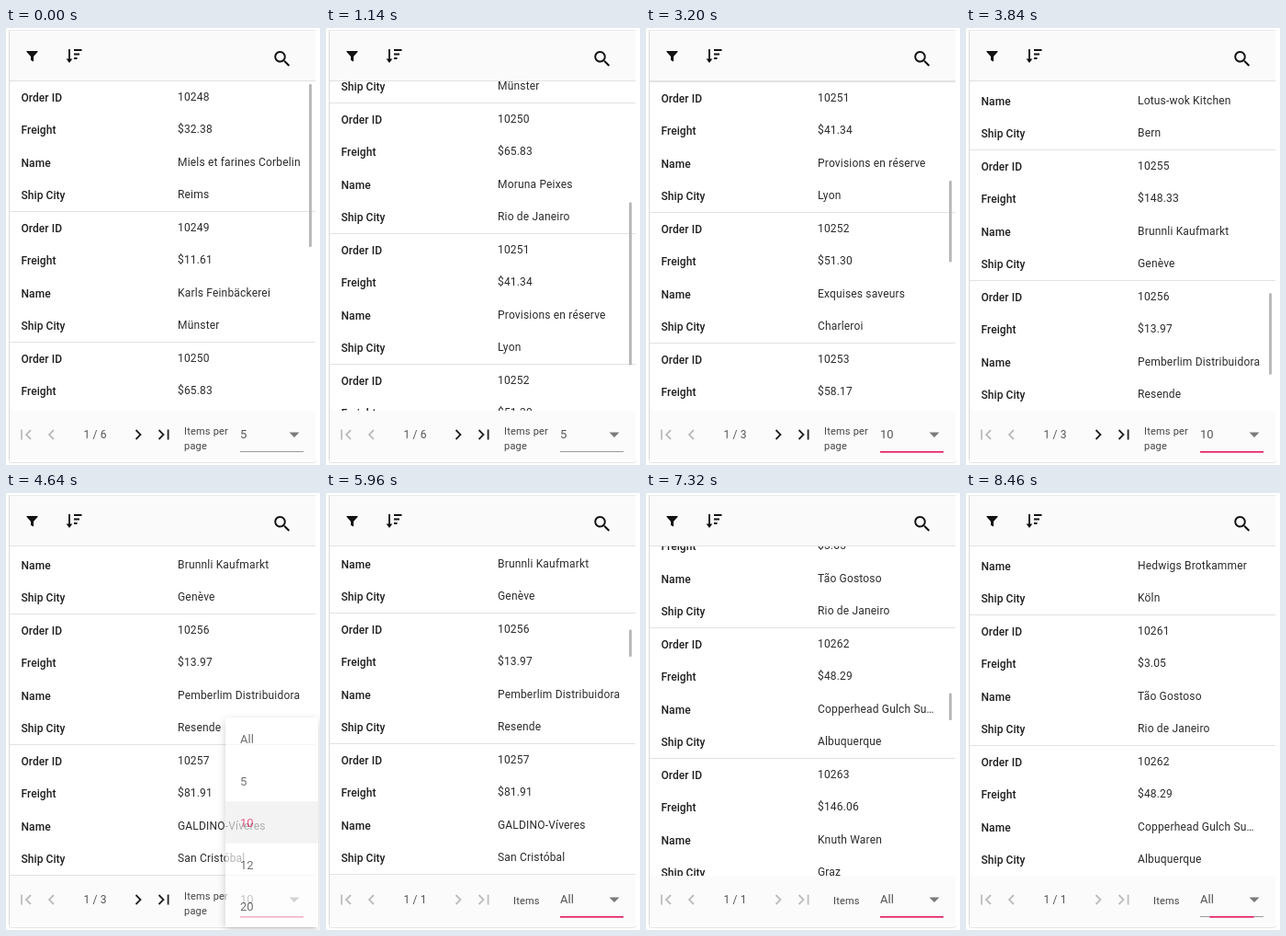
These frames come from a looping animation (342x475 px, 8.48 s). An HTML page:

```html
<!DOCTYPE html>
<html lang="en">
<head>
<meta charset="utf-8">
<title>Order list with paging</title>
<style>
html, body { margin: 0; width: 100%; height: 100%; overflow: hidden; background: #fff; }
svg { display: block; width: 342px; height: 475px; font-family: Roboto, "Open Sans", sans-serif; }
.label { font-size: 12px; font-weight: 500; letter-spacing: .06px; fill: #1f1f1f; }
.value { font-size: 12px; letter-spacing: .18px; fill: #2b2b2b; }
.pager { font-size: 12px; letter-spacing: .15px; fill: #555; }
.small { font-size: 11px; letter-spacing: .2px; fill: #444; }
.pick { font-size: 13px; fill: #555; }
.option { font-size: 13px; }
</style>
</head>
<body>
<svg viewBox="0 0 342 475" xmlns="http://www.w3.org/2000/svg">
  <defs>
    <clipPath id="view"><rect x="4" y="58" width="333" height="358"/></clipPath>
    <filter id="shade" x="-30%" y="-20%" width="160%" height="140%">
      <feDropShadow dx="0" dy="3" stdDeviation="5" flood-color="#000" flood-opacity=".28"/>
    </filter>
  </defs>
  <rect width="342" height="475" fill="#fff"/>

  <g clip-path="url(#view)"><g id="list"></g></g>
  <rect id="thumb" x="330" width="3" rx="1" fill="#bababa"/>

  <rect x="4" y="3" width="333" height="54" fill="#fafafa"/>
  <rect x="4" y="57" width="333" height="1" fill="#e2e2e2"/>
  <rect x="4" y="2" width="333" height="1" fill="#e9e9e9"/>
  <path d="M22.5 25H34.5V26L30 31V36.5L27 35V31L22.5 26Z" fill="#111"/>
  <path d="M69 23V35M74 24H82.5M74 28.5H80M74 33H77.5" fill="none" stroke="#111" stroke-width="1.8"/>
  <path d="M65.6 33.5H72.4L69 38Z" fill="#111"/>
  <path transform="translate(289.4 22.1) scale(.96)" fill="#111" d="M15.5 14h-.79l-.28-.27A6.5 6.5 0 1 0 13.73 14.43l.27.28v.79l5 4.99L20.49 19zM9.5 14a4.5 4.5 0 1 1 0-9a4.5 4.5 0 0 1 0 9z"/>

  <rect x="4" y="416" width="333" height="54" fill="#fbfbfb"/>
  <path d="M3.5 2V470Q3.5 472.5 6 472.5H335Q337.5 472.5 337.5 470" fill="none" stroke="#e4e4e4"/>
  <rect x="3" y="3" width="1" height="466" fill="#d9d9d9"/>
  <g fill="none" stroke-width="1.8">
    <path d="M17 436.5V447.5M27 437L22 442L27 447M52 437L47 442L52 447" stroke="#bdbdbd"/>
    <path id="next" d="M141.5 437L146.5 442L141.5 447M166.5 437L171.5 442L166.5 447M176.6 436.5V447.5"/>
  </g>
  <text id="page" class="pager" x="84.5" y="446"></text>
  <text id="items" class="small" y="442"></text>
  <text id="items2" class="small" x="194" y="458">page</text>
  <text id="size" class="pick" x="255" y="446"></text>
  <path d="M308.5 439.5H319.5L314 445Z" fill="#7a7a7a"/>
  <rect x="255" y="460" width="69" height="1" fill="#9a9a9a"/>
  <rect id="line" y="460" height="1.6" fill="#e3165b"/>

  <g id="popup">
    <rect x="239" y="244" width="101" height="228" rx="2" fill="#fff" filter="url(#shade)"/>
    <g id="options"></g>
  </g>
</svg>
<script>
const LOOP = 8480, STEP = 20, RECORD = 142, VIEW = 358;
const $ = id => document.getElementById(id);

function add(parent, tag, attrs, text) {
  const el = document.createElementNS("http://www.w3.org/2000/svg", tag);
  set(el, attrs);
  if (text) el.textContent = text;
  parent.appendChild(el);
  return el;
}
function set(el, attrs) {
  for (const k in attrs) el.setAttribute(k, attrs[k]);
}
const ramp = (t, a, b) => Math.min(1, Math.max(0, (t - a) / (b - a)));

const orders = `32.38|Miels et farines Corbelin|Reims
11.61|Karls Feinbäckerei|Münster
65.83|Moruna Peixes|Rio de Janeiro
41.34|Provisions en réserve|Lyon
51.30|Exquises saveurs|Charleroi
58.17|Moruna Peixes|Rio de Janeiro
22.98|Lotus-wok Kitchen|Bern
148.33|Brunnli Kaufmarkt|Genève
13.97|Pemberlim Distribuidora|Resende
81.91|GALDINO-Víveres|San Cristóbal
140.51|Knuth Waren|Graz
3.25|Galería mercantil Xolo…|México D.F.
55.09|Hedwigs Brotkammer|Köln
3.05|Tão Gostoso|Rio de Janeiro
48.29|Copperhead Gulch Su…|Albuquerque
146.06|Knuth Waren|Graz
3.67|Skog och ål HB|Bräcke`.split("\n").map(s => s.split("|"));

const labels = ["Order ID", "Freight", "Name", "Ship City"];
orders.forEach(([freight, name, city], n) => {
  const top = 57 + n * RECORD;
  [10248 + n, "$" + freight, name, city].forEach((value, i) => {
    const y = top + Math.floor(35.5 * i);
    add($("list"), "text", { class: "label", x: 16.5, y: y + 23 }, labels[i]);
    add($("list"), "text", { class: "value", x: 187, y: y + 22 }, String(value));
  });
  add($("list"), "rect", { x: 4, y: top + RECORD, width: 333, height: 1, fill: "#e2e2e2" });
});

const sizes = ["All", "5", "10", "12", "20"];
const options = sizes.map((text, i) => {
  const y = 244 + i * 45.6;
  return {
    bg: add($("options"), "rect", { x: 239, y, width: 101, height: 45.6 }),
    label: add($("options"), "text", { class: "option", x: 255, y: y + 28 }, text)
  };
});

// [time, scroll offset]
const path = [
  [620, 0], [740, 100], [880, 100], [1140, 260], [1320, 352],
  [3120, 352], [3200, 425], [3840, 919], [3980, 1062],
  [5940, 1062], [5960, 1063], [6560, 1719], [6800, 1980],
  [6810, 1980], [7180, 1905], [7300, 1905], [7520, 1838],
  [7640, 1838], [7820, 1771]
];
function scrollAt(t) {
  if (t <= path[0][0]) return 0;
  for (let i = 1; i < path.length; i++) {
    const [a, from] = path[i - 1], [b, to] = path[i];
    if (t <= b) return Math.round(from + (to - from) * ramp(t, a, b));
  }
  return path[path.length - 1][1];
}

// [shown from, fade start, fade end]
const shown = [[0, 1500, 1700], [3140, 4160, 4380], [5960, 8020, 8240]];
// [open, hover, close start, close end, chosen before, chosen after]
const menus = [[2080, 2580, 2640, 2780, "5", "10"], [4600, 5300, 5360, 5520, "10", "All"]];

function drawMenu(t) {
  const menu = menus.find(m => t >= m[0] && t < m[3]);
  $("popup").style.display = menu ? "" : "none";
  if (!menu) return;
  const [open, hover, close, end, before, after] = menu;
  set($("popup"), { opacity: ramp(t, open, open + 60) * (1 - ramp(t, close, end)) });
  options.forEach(({ bg, label }, i) => {
    const active = sizes[i] === (t < close ? before : after);
    const over = t >= hover && sizes[i] === after;
    set(bg, { fill: active || over ? "#eeeeee" : "#fff" });
    set(label, { fill: active ? "#e3165b" : "#2b2b2b" });
  });
}

function draw(t) {
  const count = t < 2660 ? 5 : t < 5380 ? 10 : 30;
  const all = count === 30;
  const top = scrollAt(t);
  set($("list"), { transform: `translate(0 ${-top})` });

  const scale = 351 / (count * RECORD);
  const bar = shown.find(s => t >= s[0] && t < s[2]);
  set($("thumb"), {
    y: 61 + top * scale, height: VIEW * scale,
    opacity: bar ? 1 - ramp(t, bar[1], bar[2]) : 0
  });

  $("page").textContent = "1 / " + 30 / count;
  $("size").textContent = all ? "All" : count;
  $("items").textContent = all ? "Items" : "Items per";
  set($("items"), { x: all ? 204 : 194, y: all ? 447 : 442 });
  $("items2").style.display = all ? "none" : "";
  set($("next"), { stroke: all ? "#bdbdbd" : "#222" });

  const half = 34.5 * ramp(t, 2080, 2180) * (1 - .3 * ramp(t, 8400, 8460));
  set($("line"), { x: 289.5 - half, width: 2 * half });
  drawMenu(t);
}

const start = performance.now();
function tick() {
  const t = (performance.now() - start) % LOOP;
  draw(Math.floor(t / STEP) * STEP);
  requestAnimationFrame(tick);
}
tick();
</script>
</body>
</html>
```
